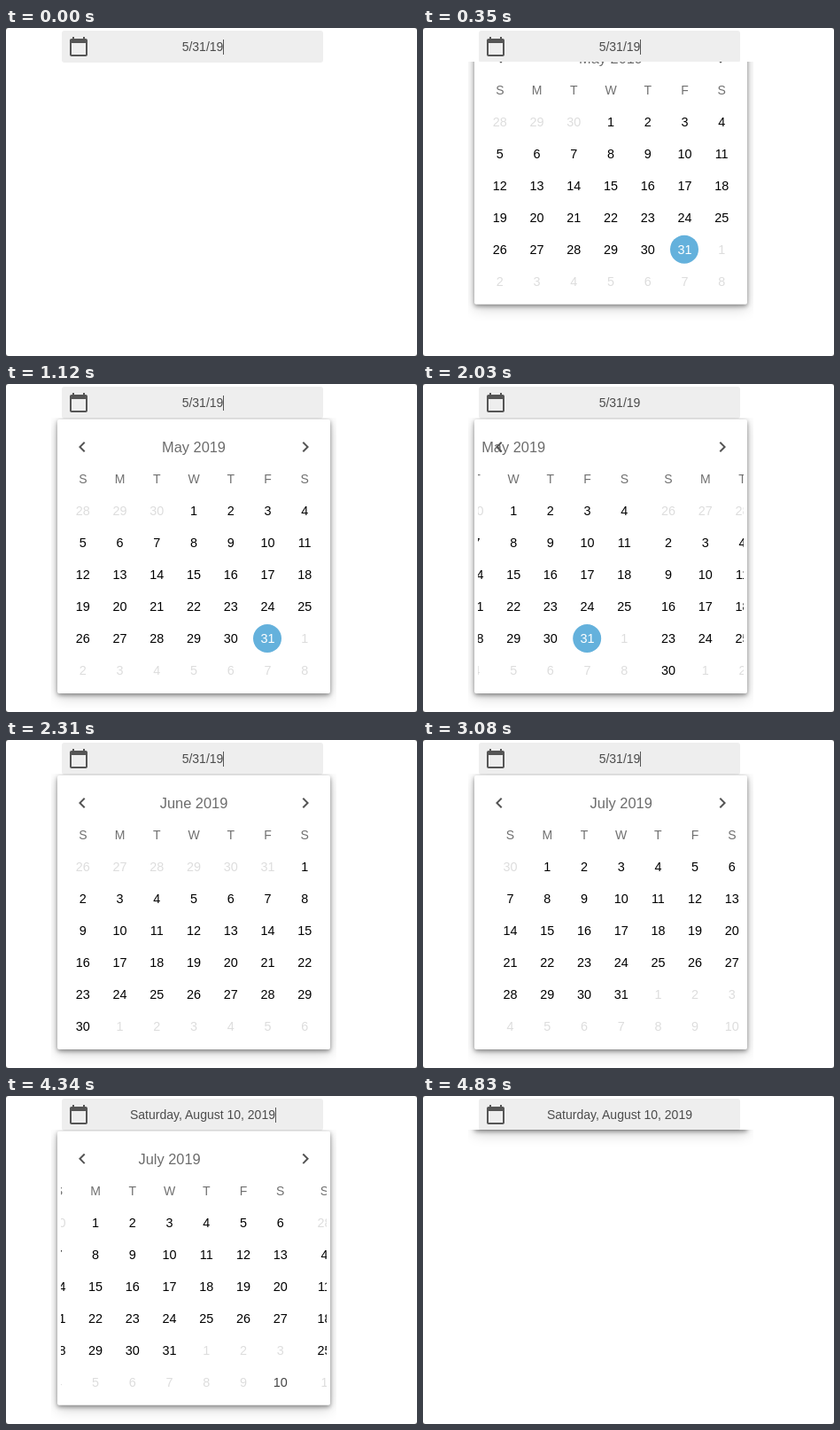
An HTML page for the animation above (4900 ms loop, 464x370 px).

```html
<!DOCTYPE html>
<html lang="en">
<head>
<meta charset="utf-8">
<title>Date picker</title>
<style>
  html, body { margin: 0; width: 100%; height: 100%; overflow: hidden; background: #555; }
  body { font-family: "Liberation Sans", Arial, sans-serif; }
  div, svg { position: absolute; }
  #stage { width: 464px; height: 370px; background: #fff; border-radius: 3px; overflow: hidden; }
  #field { left: 62.5px; top: 3px; width: 295px; height: 36px; border-radius: 3px; background: #eee; }
  #value { left: 72px; top: 3px; width: 300px; font-size: 14px; line-height: 36px; text-align: center; color: #4c4c4c; }
  #caret { top: 13px; width: 1px; height: 17px; background: #555; }
  svg { width: 24px; height: 24px; fill: #555; }
  #clip { left: 51px; top: 38px; width: 322px; height: 332px; overflow: hidden; }
  #panel {
    left: 7px; top: 2px; width: 308px; height: 309px; border-radius: 2px; background: #fff;
    box-shadow: 0 2px 5px rgba(0,0,0,.42), 0 4px 16px rgba(0,0,0,.2);
  }
  #pages { left: 4px; width: 300px; height: 309px; overflow: hidden; }
  .page { left: 4px; top: 13px; width: 292px; text-align: center; }
  .title { position: static; font-size: 16.4px; line-height: 36px; color: #6c6c6c; }
  .grid { display: grid; grid-template-columns: repeat(7, 1fr); grid-auto-rows: 36px; width: 292px; font-size: 14.4px; }
  .grid span { width: 32px; line-height: 32px; margin: 2px auto; border-radius: 50%; }
  .grid .weekday { font-size: 14px; color: #707070; }
  .grid .outside { color: #ddd; }
  .grid .selected { background: #64b1dc; color: #fff; }
</style>
</head>
<body>
<div id="stage">
  <div id="field"></div>
  <svg style="left:70px;top:9px" viewBox="0 0 24 24"><path d="M20 3h-1V1h-2v2H7V1H5v2H4c-1.1 0-2 .9-2 2v16c0 1.1.9 2 2 2h16c1.1 0 2-.9 2-2V5c0-1.1-.9-2-2-2zm0 18H4V8h16v13z"/></svg>
  <div id="value"></div>
  <div id="caret"></div>
  <div id="clip">
    <div id="panel">
      <div id="pages"></div>
      <svg style="left:16px;top:19px" viewBox="0 0 24 24"><path d="M15.41 7.41 14 6l-6 6 6 6 1.41-1.41L10.83 12z"/></svg>
      <svg style="left:268px;top:19px" viewBox="0 0 24 24"><path d="M8.59 16.59 10 18l6-6-6-6-1.41 1.41L13.17 12z"/></svg>
    </div>
  </div>
</div>
<script>
const LOOP = 4900;
const PAGE_WIDTH = 300;
const PANEL_TRAVEL = 311;
const SLIDE_STARTS = [1997, 2907, 4332.5];
const CARET_OFF = [[560, 1085], [1610, 2100], [3150, 3640], [4550, 4900]];
const MONTHS = { 4: 'May', 5: 'June', 6: 'July', 7: 'August' };
const SELECTED = { 4: 31, 7: 10 };
const $ = id => document.getElementById(id);

const progress = (t, start, duration) => Math.min(1, Math.max(0, (t - start) / duration));

// cubic-bezier(.25, .8, .25, 1)
function ease(x) {
  if (x <= 0 || x >= 1) return x;
  const bezier = (s, a, b) => 3 * (1 - s) ** 2 * s * a + 3 * (1 - s) * s * s * b + s ** 3;
  let low = 0, high = 1;
  for (let i = 0; i < 24; i++) {
    const mid = (low + high) / 2;
    if (bezier(mid, .25, .25) < x) low = mid; else high = mid;
  }
  return bezier(low, .8, 1);
}

function buildPage(month) {
  const page = document.createElement('div');
  const lead = new Date(2019, month, 1).getDay();
  let cells = [...'SMTWTFS'].map(d => `<span class="weekday">${d}</span>`).join('');
  for (let i = 0; i < 42; i++) {
    const date = new Date(2019, month, 1 - lead + i);
    const day = date.getDate();
    const style = date.getMonth() !== month ? 'outside' : day === SELECTED[month] ? 'selected' : '';
    cells += `<span class="${style}">${day}</span>`;
  }
  page.className = 'page';
  page.innerHTML = `<div class="title">${MONTHS[month]} 2019</div><div class="grid">${cells}</div>`;
  $('pages').append(page);
  return page;
}

const pages = [4, 5, 6, 7].map(buildPage);
const hoveredDay = pages[2].querySelector('.grid').lastElementChild;

function render(t) {
  const picked = t >= 4130;
  const text = picked ? 'Saturday, August 10, 2019' : '5/31/19';
  if ($('value').textContent !== text) $('value').textContent = text;
  $('caret').style.left = (picked ? 304 : 245) + 'px';
  $('caret').hidden = CARET_OFF.some(([from, to]) => t >= from && t < to);

  // The panel closes along the reversed opening curve.
  const open = t < 4280 ? ease(progress(t, 132, 550)) : ease(1 - progress(t, 4305, 520));
  $('clip').hidden = t < 132;
  $('panel').style.transform = `translateY(${-PANEL_TRAVEL * (1 - open)}px)`;

  const position = SLIDE_STARTS.reduce((sum, start) => sum + ease(progress(t, start, 300)), 0);
  pages.forEach((page, i) => {
    page.style.transform = `translateX(${(i - position) * PAGE_WIDTH}px)`;
  });

  const hover = ease(progress(t, 3480, 300));
  const shade = 221 - 153 * hover;
  hoveredDay.style.color = `rgb(${shade},${shade},${shade})`;
  hoveredDay.style.background = `rgba(0,0,0,${t < 4270 ? .1 * hover : 0})`;
}

const origin = performance.now();
function tick() {
  render((performance.now() - origin) % LOOP);
  requestAnimationFrame(tick);
}
tick();
</script>
</body>
</html>
```
